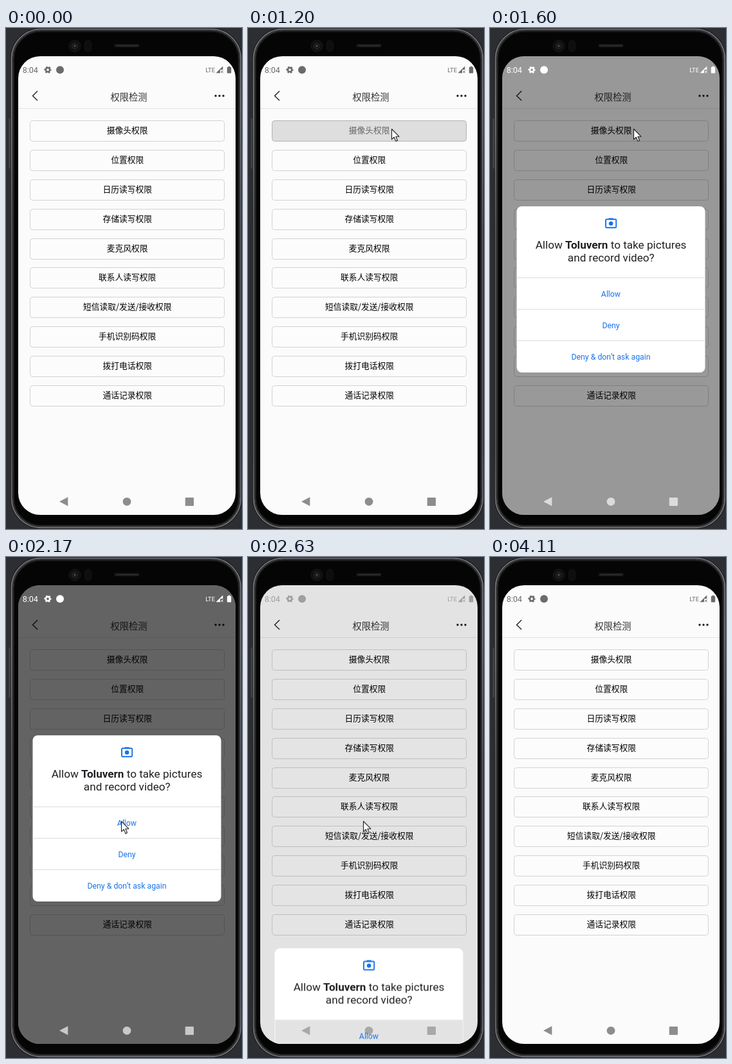
Write an HTML page that moves like this. It is 367 px wide and 781 px high and loops after 4960 ms.

```html
<!DOCTYPE html>
<html lang="zh-CN">
<head>
<meta charset="utf-8">
<title>权限检测</title>
<style>
  html, body { margin: 0; width: 100%; height: 100%; overflow: hidden; background: #2d2e32; }
  svg { display: block; width: 367px; height: 781px; }
  text { font-family: "Noto Sans CJK SC", "Noto Sans CJK", sans-serif; text-anchor: middle; }
  .latin { font-family: Roboto, sans-serif; }
  .row rect { fill: #fcfcfc; stroke: #d2d2d2; }
  .row text { font-size: 12.75px; fill: #000; }
  .title { font-size: 17.15px; fill: #202124; }
  .option { font-size: 12.3px; fill: #1a73e8; }
  .ask { transform-origin: 188px 407px; opacity: 0; }
  #status { color: #6b6b6b; fill: currentColor; }
  #nav { color: rgba(0, 0, 0, .44); fill: currentColor; }
  #dim, #strip, #toast { opacity: 0; }
</style>
</head>
<body>
<svg viewBox="0 0 367 781">
  <defs>
    <clipPath id="screen"><rect x="19" y="44" width="338" height="715" rx="34"/></clipPath>
    <linearGradient id="rim" x1="0" y1="0" x2="0" y2="1">
      <stop offset="0" stop-color="#7d7e80"/>
      <stop offset=".15" stop-color="#8d8e90"/>
      <stop offset=".4" stop-color="#66676a"/>
      <stop offset=".85" stop-color="#66676a"/>
      <stop offset="1" stop-color="#858688"/>
    </linearGradient>
  </defs>

  <g id="phone">
    <rect width="367" height="781" fill="#2d2e32"/>
    <path d="M5.5 141V219" stroke="#47484b" stroke-width="2"/>
    <rect x="8.4" y="1.6" width="357" height="777.6" rx="46" fill="#050505" stroke="#161617" stroke-width="3"/>
    <rect x="8.6" y="1.8" width="356.6" height="777.2" rx="46" fill="none" stroke="url(#rim)" stroke-width="1.6"/>
    <rect x="10.6" y="3.8" width="352.6" height="773.2" rx="44" fill="none" stroke="#3a3b3d" stroke-width="2"/>
    <rect x="12.4" y="5.6" width="349" height="769.6" rx="42" fill="none" stroke="#18181a" stroke-width="1.6"/>
    <circle cx="107" cy="28" r="9" fill="#101011" stroke="#19191a"/>
    <circle cx="107" cy="28" r="4.5" fill="#18191b" stroke="#27282c"/>
    <circle cx="107" cy="28" r="1.4" fill="#505257"/>
    <rect x="122.5" y="19" width="10" height="18" rx="5" fill="#0e0e0f" stroke="#141415"/>
    <rect x="168.5" y="25" width="39" height="5" rx="2.5" fill="#1a1a1b"/>
    <path d="M172 27.5H205" stroke="#343436"/>
  </g>

  <g clip-path="url(#screen)">
    <rect x="19" y="44" width="338" height="715" fill="#fbfbfb"/>
    <path d="M19 125.5H357" stroke="#e2e2e2"/>
    <path d="M49 98.3L41.5 105.7 49 113.1" fill="none" stroke="#222" stroke-width="1.4"/>
    <text x="191" y="112.8" font-size="14.3" fill="#333">权限检测</text>
    <g fill="#222">
      <circle cx="326" cy="105.7" r="1.7"/><circle cx="332" cy="105.7" r="1.7"/><circle cx="338" cy="105.7" r="1.7"/>
    </g>
    <g id="rows"></g>

    <rect id="dim" x="19" y="44" width="338" height="715"/>

    <g class="ask">
      <rect x="41.5" y="278" width="293" height="259" rx="8" fill="#fff"/>
      <path d="M41.5 389.5h293M41.5 438.5h293M41.5 487.5h293" stroke="#dadce0"/>
    </g>
    <path id="strip" d="M42 722H334V759H42Z" fill="#e3e3e3" stroke="#f0f0f0"/>

    <g id="status">
      <text class="latin" x="37.8" y="70" font-size="12.6">8:04</text>
      <g fill="none" stroke="currentColor">
        <circle cx="65" cy="65.2" r="3.1" stroke-width="2.5"/>
        <circle cx="65" cy="65.2" r="4.7" stroke-width="1.8" stroke-dasharray="2.7 2.222" stroke-dashoffset="1.35"/>
      </g>
      <circle cx="84" cy="65.2" r="6"/>
      <text class="latin" x="317.6" y="69" font-size="9.5">LTE</text>
      <path d="M326.5 70.3L337.3 59.5V65H333V70.3Z"/>
      <path d="M334.2 66.4l3.4 3.8m0-3.8l-3.4 3.8" stroke="currentColor"/>
      <path d="M345.5 59.7h3v1.2h1.2q.5 0 .5.5v8.4q0 .7-.7.7h-5q-.7 0-.7-.7v-8.4q0-.5.5-.5h1.2z"/>
    </g>
    <g id="nav">
      <path d="M83 738.3L96.3 731.3V745.3Z"/>
      <circle cx="188" cy="738.3" r="6.4"/>
      <rect x="278.7" y="732" width="13.3" height="13" rx="1"/>
    </g>

    <g class="ask">
      <g fill="none" stroke="#1a73e8" stroke-width="1.9">
        <rect x="180" y="298.2" width="16.2" height="13" rx="1.2"/>
        <path d="M184.5 297.3h7.2"/>
      </g>
      <circle cx="188.1" cy="304.8" r="3.3" fill="#1a73e8"/>
      <text class="latin title" x="188" y="343.6">Allow <tspan font-weight="700">Toluvern</tspan> to take pictures</text>
      <text class="latin title" x="188.3" y="363.7">and record video?</text>
      <text class="latin option" x="188" y="418.8">Allow</text>
      <text class="latin option" x="188" y="468">Deny</text>
      <text class="latin option" x="188" y="517.2">Deny &amp; don’t ask again</text>
    </g>

    <g id="toast">
      <rect x="127.5" y="353" width="120.5" height="97" rx="9" fill-opacity=".7"/>
      <path d="M164 390.5L168.3 386.8 178.3 396Q192 382 210.5 373.6L212 375.6Q195 387.5 179.2 408.2Z" fill="#fff"/>
      <text x="187.7" y="435.2" font-size="14.2" fill="#fff">授权成功!</text>
    </g>
  </g>

  <path id="cursor" d="M.5 .5V16.6L4.2 13.2 6.9 19.4 9.5 18.3 6.9 12.2H11.9Z" fill="#fff" stroke="#1c1c22" stroke-width="1.1" stroke-linejoin="round"/>
</svg>
<script>
const LOOP = 4960;
const HOLD = 'steps(1)';
const labels = ['摄像头权限', '位置权限', '日历读写权限', '存储读写权限', '麦克风权限',
  '联系人读写权限', '短信读取/发送/接收权限', '手机识别码权限', '拨打电话权限', '通话记录权限'];

document.getElementById('rows').innerHTML = labels.map((label, i) => {
  const y = 144.5 + Math.round(45.88 * i);
  return `<g class="row"><rect x="37.5" y="${y}" width="302" height="32" rx="4"/>
    <text x="188.7" y="${y + 19.9}">${label}</text></g>`;
}).join('');

// Each step is [ms, css, easing to the next step]; the loop closes on the first one.
function play(selector, steps) {
  const frames = [...steps, [LOOP, steps[0][1]]].map(
    ([ms, css, easing = 'linear']) => ({ offset: ms / LOOP, easing, ...css }));
  document.querySelectorAll(selector).forEach(
    el => el.animate(frames, { duration: LOOP, iterations: Infinity }));
}

const at = (x, y) => ({ transform: `translate(${x}px, ${y}px)` });
const slide = (y, scale = 1) => ({ transform: `translateY(${y}px) scale(${scale})` });
const alpha = opacity => ({ opacity });
const tint = color => ({ color });

// Shows an element between two moments, with hard cuts.
const flash = (selector, from, to) =>
  play(selector, [[0, alpha(0), HOLD], [from, alpha(1), HOLD], [to, alpha(0), HOLD]]);

// Turns system icons light while the dialog is open.
const lighten = (selector, dark, light) => play(selector, [
  [0, tint(dark), HOLD], [1470, tint(dark)], [1590, tint(light), HOLD],
  [2540, tint(light)], [2680, tint(dark), HOLD]
]);

play('#cursor', [
  [0, at(-30, 139), HOLD],
  [90, at(3, 139), 'cubic-bezier(.3,.4,.4,1)'],
  [600, at(223, 157), HOLD],
  [1690, at(223, 157), 'cubic-bezier(.4,.1,.4,1)'],
  [1990, at(169, 408), 'ease-out'],
  [2170, at(179, 411.5), HOLD],
  [3230, at(180, 424), 'cubic-bezier(.3,.25,.6,.9)'],
  [3740, at(267, 778), HOLD],
  [3770, at(-30, 139), HOLD]
]);

const idle = { fill: '#fcfcfc', stroke: '#d2d2d2' };
play('.row:first-child rect', [
  [0, idle, HOLD], [1200, { fill: '#dedede', stroke: '#b2b2b2' }, HOLD], [1260, idle, HOLD]
]);
play('.row:first-child text', [
  [0, { fill: '#000' }, HOLD], [1200, { fill: '#666' }, HOLD], [1260, { fill: '#000' }, HOLD]
]);

play('#dim', [
  [0, alpha(0), HOLD], [1470, alpha(0)], [1670, alpha(.603), HOLD],
  [2420, alpha(.603)], [2660, alpha(.025)], [2660, alpha(0), HOLD]
]);

play('.ask', [
  [0, { ...slide(0, .9), opacity: 0 }, HOLD],
  [1470, { ...slide(0, .9), opacity: 0 }, 'ease-out'],
  [1580, { ...slide(0), opacity: 1 }, HOLD],
  [2420, { ...slide(0), opacity: 1 }, 'cubic-bezier(.333,0,.667,.333)'],
  [2660, { ...slide(430), opacity: 1 }],
  [2660, { ...slide(0, .9), opacity: 0 }, HOLD]
]);

lighten('#status', '#6b6b6b', '#ffffff');
lighten('#nav', 'rgba(0, 0, 0, .44)', 'rgba(255, 255, 255, .65)');
flash('#strip', 2615, 2660);
flash('#toast', 2800, 4110);
</script>
</body>
</html>
```
